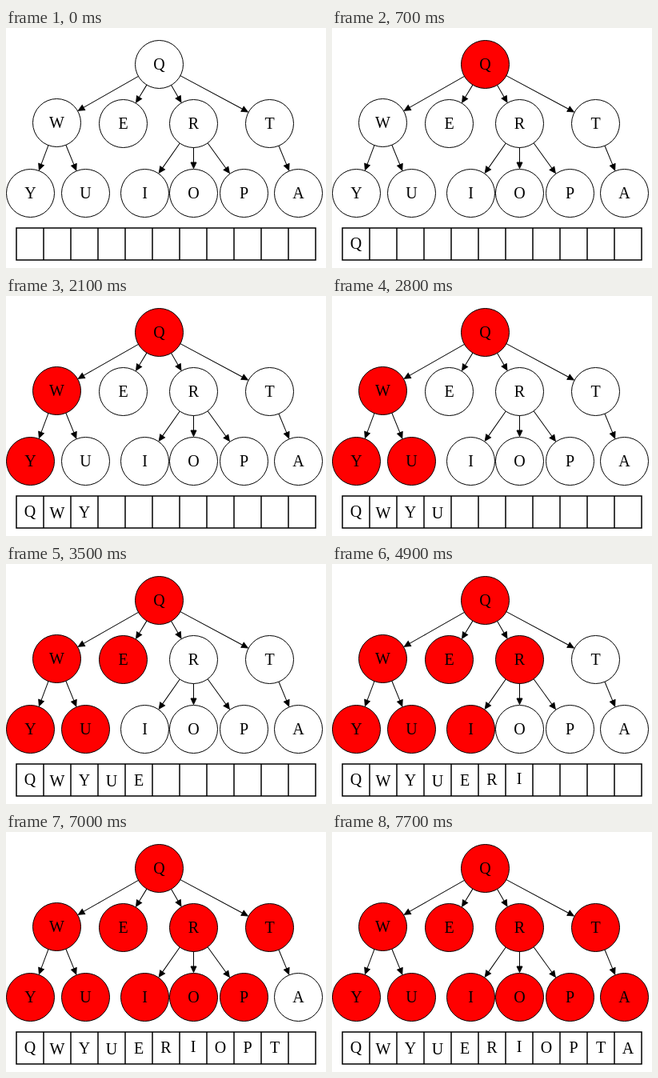
Write an HTML page that moves like this. It is 400 by 300 pixels and loops after 8400 ms.

```html
<!DOCTYPE html>
<html lang="en">
<head>
<meta charset="utf-8">
<title>Preorder traversal</title>
<style>
  html, body { margin: 0; width: 100%; height: 100%; overflow: hidden; background: #fff; }
  svg { display: block; width: 100%; height: 100%; }
  text { font: 20px "Liberation Serif", "Times New Roman", serif; text-anchor: middle; }
  circle { stroke: #000; stroke-width: 1; }
  .edge { stroke: #000; stroke-width: 1; }
  .grid { fill: none; stroke: #000; stroke-width: 1.5; }
</style>
</head>
<body>
<svg id="stage" viewBox="0 0 400 300"></svg>
<script>
const STEP = 700;
const RADIUS = 30;
const CELL = 34;
const LEFT = 13;
const stage = document.getElementById('stage');

// Nodes in visiting order: label, centre, parent, baseline in the output row
const nodes = [
  ['Q', 191.5, 45.5, '', 276],
  ['W', 63.5, 118.5, 'Q', 277.5],
  ['Y', 30.5, 206.5, 'W', 277],
  ['U', 99.5, 206.5, 'W', 277.5],
  ['E', 146.5, 119.5, 'Q', 277],
  ['R', 234.5, 119.5, 'Q', 276],
  ['I', 173.5, 206.5, 'R', 275],
  ['O', 234.5, 206.5, 'R', 276],
  ['P', 297.5, 206.5, 'R', 276],
  ['T', 329.5, 119.5, 'Q', 276],
  ['A', 365.5, 206.5, 'T', 277]
].map(([label, x, y, parent, base]) => ({ label, x, y, parent, base }));

function add(tag, attrs, text) {
  const el = document.createElementNS('http://www.w3.org/2000/svg', tag);
  for (const key in attrs) el.setAttribute(key, attrs[key]);
  if (text) el.textContent = text;
  stage.appendChild(el);
  return el;
}

function arrow(from, to) {
  const dx = to.x - from.x, dy = to.y - from.y;
  const len = Math.hypot(dx, dy);
  const angle = Math.atan2(dy, dx) * 180 / Math.PI;
  const tip = len - RADIUS;
  add('path', {
    class: 'edge',
    transform: `translate(${from.x} ${from.y}) rotate(${angle})`,
    d: `M${RADIUS} 0H${tip - 8}M${tip - 1} 0l-7.5 -3.5v7z`
  });
}

for (const node of nodes) {
  node.disc = add('circle', { cx: node.x, cy: node.y, r: RADIUS, fill: '#fff' });
  add('text', { x: node.x, y: node.y + 6.5 }, node.label);
}
for (const node of nodes) {
  const parent = nodes.find(n => n.label === node.parent);
  if (parent) arrow(parent, node);
}

let grid = `M${LEFT} 250h${CELL * nodes.length}v40h${-CELL * nodes.length}z`;
nodes.forEach((node, i) => {
  const x = LEFT + CELL * i;
  if (i) grid += `M${x} 250v40`;
  node.output = add('text', { x: x + CELL / 2, y: node.base }, node.label);
});
add('path', { class: 'grid', d: grid });

function draw(time) {
  const visited = Math.floor(time / STEP) % (nodes.length + 1);
  nodes.forEach((node, i) => {
    const on = i < visited;
    node.disc.setAttribute('fill', on ? '#f00' : '#fff');
    node.output.setAttribute('visibility', on ? 'visible' : 'hidden');
  });
}

const start = performance.now();
function tick() {
  draw(performance.now() - start);
  requestAnimationFrame(tick);
}
draw(0);
requestAnimationFrame(tick);
</script>
</body>
</html>
```
